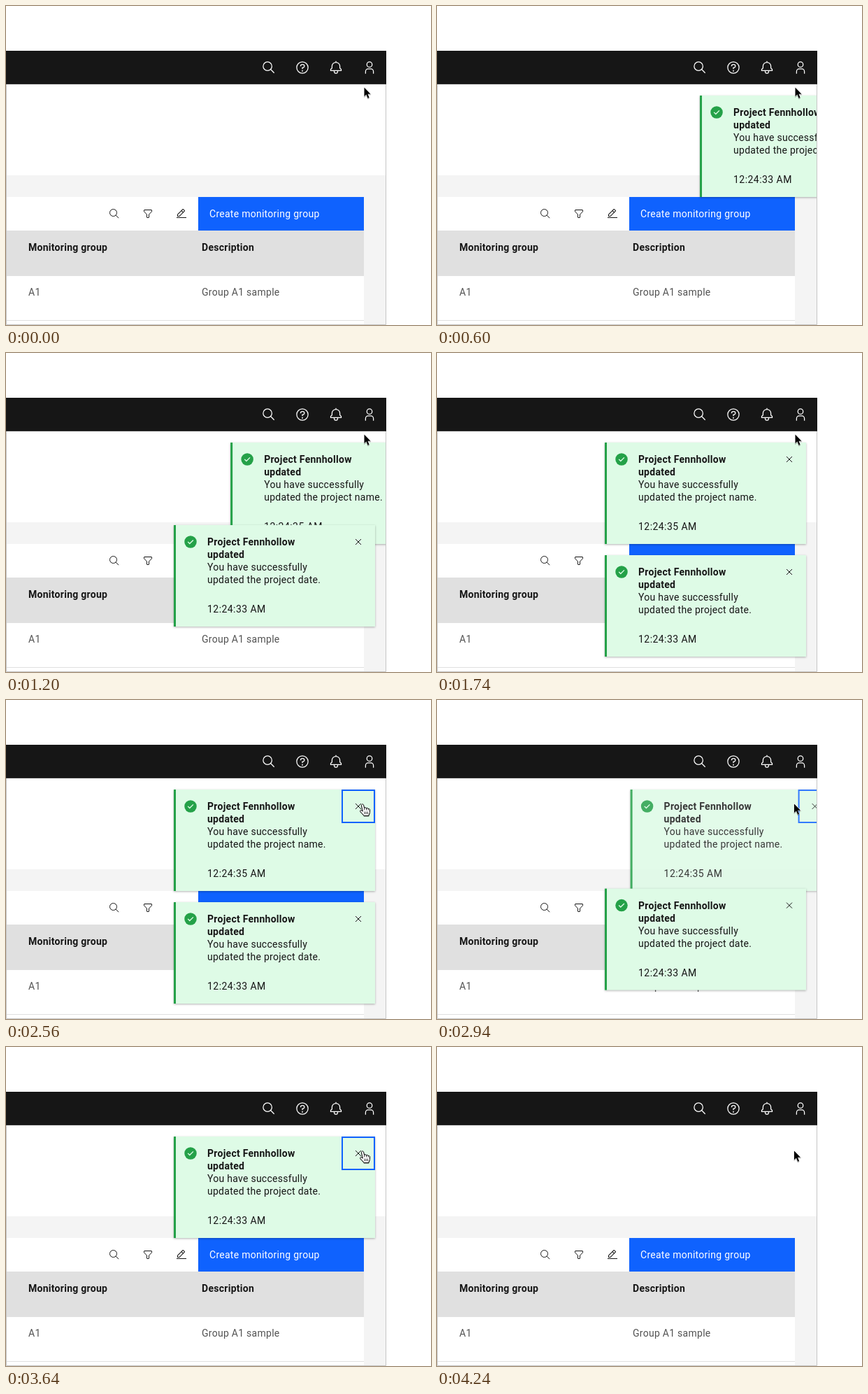
These frames come from a looping animation (608 px wide and 456 px high, 4530 ms). An HTML page:

```html
<!DOCTYPE html>
<html lang="en">
<head>
<meta charset="utf-8">
<title>Toast notifications</title>
<style>
  html, body { margin: 0; width: 100%; height: 100%; overflow: hidden; background: #fff; }
  svg { display: block; }
  text { font: 14px Roboto, "Open Sans", sans-serif; letter-spacing: .27px; fill: #161616; }
  .bold { font-weight: 600; }
  .soft { fill: #525252; }
  .time { letter-spacing: .45px; }
  .line { fill: none; stroke: currentColor; stroke-width: 2; }
  .card { fill: #defbe6; filter: drop-shadow(0 1.5px 1.8px rgba(0, 0, 0, .3)); }
  .focus { fill: none; stroke: #0f62fe; stroke-width: 2; }
</style>
</head>
<body>
<svg width="608" height="456" viewBox="0 0 608 456">
  <defs>
    <clipPath id="panel"><rect y="64" width="544" height="392"/></clipPath>
    <g id="search" class="line"><circle cx="13" cy="13" r="10"/><path d="M20.5 20.5l7.8 7.8"/></g>
    <g id="help">
      <g class="line"><circle cx="16" cy="16" r="13"/>
        <path d="M12 13v-.5A3.5 3.5 0 0 1 15.5 9H17a3.5 3.5 0 0 1 0 7H16v3.5"/></g>
      <circle cx="16" cy="23.5" r="1.5" fill="currentColor"/>
    </g>
    <path id="bell" class="line" d="M16 1v3M4 23v-3l3-3v-4a9 9 0 0 1 18 0v4l3 3v3ZM12 23v2a4 4 0 0 0 8 0v-2"/>
    <g id="user" class="line"><circle cx="16" cy="9" r="6"/>
      <path d="M7 30v-5a6 6 0 0 1 6-6h6a6 6 0 0 1 6 6v5"/></g>
    <path id="filter" class="line" d="M6 5h20a1 1 0 0 1 1 1v3.6l-8 8.4v8a1 1 0 0 1-1 1h-4a1 1 0 0 1-1-1v-8l-8-8.4V6a1 1 0 0 1 1-1Z"/>
    <path id="edit" fill="currentColor" fill-rule="evenodd" d="M2 26h28v2H2zM25.4 9c.8-.8.8-2 0-2.8l-3.6-3.6c-.8-.8-2-.8-2.8 0l-15 15V24h6.4L25.4 9zM20.4 4L24 7.6l-3 3L17.4 7 20.4 4zM6 22v-3.6l10-10 3.6 3.6-10 10H6z"/>
  </defs>

  <rect width="608" height="456" fill="#fff"/>
  <rect y="242" width="544" height="214" fill="#f4f4f4"/>
  <rect y="273" width="512" height="183" fill="#fff"/>
  <rect x="275" y="273" width="237" height="48" fill="#0f62fe"/>
  <rect y="321" width="512" height="65" fill="#e0e0e0"/>
  <rect y="449" width="512" height="1" fill="#e0e0e0"/>
  <rect y="64" width="544" height="47" fill="#161616"/>
  <rect y="111" width="544" height="1" fill="#393939"/>

  <g id="icons"></g>

  <text x="291" y="302" style="fill:#fff">Create monitoring group</text>
  <text x="32" y="350" class="bold">Monitoring group</text>
  <text x="280" y="350" class="bold">Description</text>
  <text x="32" y="414" class="soft">A1</text>
  <text x="280" y="414" class="soft">Group A1 sample</text>

  <g id="toasts" clip-path="url(#panel)"></g>
  <path d="M.5 112V455.5H543.5V112" fill="none" stroke="#c6c6c6"/>

  <g id="cursor" stroke-linejoin="round" stroke-linecap="round">
    <path id="arrow" d="M0 0V12.8L2.9 10 5.1 15.2 7.1 14.4 5 9.3H9Z" fill="#000" stroke="#fff"
      style="paint-order:stroke;filter:drop-shadow(0 1px .7px rgba(0,0,0,.35))"/>
    <g id="hand" stroke="#000" style="filter:drop-shadow(0 1px .7px rgba(0,0,0,.3))">
      <path fill="#fff" d="M-2.6 1.8C-2.6-.1.2-.1.6 1.6L1.6 6C2 4.8 4.2 4.9 4.5 6.4 5 5.5 7 5.7 7.2 7.2 7.8 6.5 9.4 6.9 9.5 8.4V12C9.3 14 8 15 8 17H1C.6 15.5-2 13.6-4 11-5 9.6-3.6 8.4-2.2 9.4L-1 10.4Z"/>
      <path fill="none" stroke-width=".8" d="M1.6 6V8.4M4.5 6.4V8.6M7.2 7.2V8.8M2 11.5V14.5M4.2 11.5V14.5M6.4 11.5V14.5"/>
    </g>
  </g>
</svg>
<script>
const LOOP = 4530, LEFT = 240, TOP = 128, TRAVEL = 304, PITCH = 161;
const $ = id => document.getElementById(id);
const show = (el, on) => el.style.display = on ? '' : 'none';

function bezier(x1, y1, x2, y2) {
  const at = (a, b, s) => 3 * (1 - s) * (1 - s) * s * a + 3 * (1 - s) * s * s * b + s ** 3;
  return x => {
    let lo = 0, hi = 1;
    for (let i = 0; i < 24; i++) {
      const mid = (lo + hi) / 2;
      if (at(x1, x2, mid) < x) lo = mid; else hi = mid;
    }
    return at(y1, y2, (lo + hi) / 2);
  };
}
const glide = bezier(.4, .14, .3, 1);
const drift = bezier(.42, 0, .58, 1);

function ramp(t, start, length, ease = glide) {
  const x = (t - start) / length;
  return x <= 0 ? 0 : x >= 1 ? 1 : ease(x);
}

const icon = (name, x, y, size, color) =>
  `<use href="#${name}" color="${color}" transform="translate(${x - size / 2} ${y - size / 2}) scale(${size / 32})"/>`;

$('icons').innerHTML =
  ['search', 'help', 'bell', 'user'].map((n, i) => icon(n, 376 + 48 * i, 88, 20, '#fff')).join('') +
  ['search', 'filter', 'edit'].map((n, i) => icon(n, 155 + 48 * i, 297, 16, '#161616')).join('');

function makeToast(field, time) {
  const line = (y, text, cls = '') => `<text x="48" y="${y}" class="${cls}">${text}</text>`;
  const g = document.createElementNS('http://www.w3.org/2000/svg', 'g');
  g.innerHTML = `
    <rect class="card" width="288" height="145"/>
    <rect width="3" height="145" fill="#24a148"/>
    <g transform="translate(14 14) scale(.625)">
      <circle cx="16" cy="16" r="14" fill="#24a148"/>
      <path d="M14 21.5l-5-4.96L10.59 15 14 18.35 21.41 11 23 12.58Z" fill="#defbe6"/>
    </g>
    <path d="M260 20l8 8M268 20l-8 8" stroke="#161616"/>
    ${line(29, 'Project Fennhollow', 'bold')}${line(47, 'updated', 'bold')}
    ${line(65, 'You have successfully')}${line(83, `updated the project ${field}.`)}
    ${line(125, time, 'time')}
    <rect class="focus" x="241" y="1" width="46" height="46"/>`;
  $('toasts').append(g);
  return { g, focus: g.querySelector('.focus') };
}
const newer = makeToast('name', '12:24:35 AM');
const older = makeToast('date', '12:24:33 AM');

// Places a toast and tells whether the pointer is on its close button.
function place(toast, enter, leave, drop, visible, focused, px, py) {
  const dx = TRAVEL * (1 - enter + leave), dy = PITCH * drop;
  const alpha = Math.max(0, 1 - 1.25 * leave);
  show(toast.g, visible && alpha > 0);
  show(toast.focus, focused);
  toast.g.setAttribute('transform', `translate(${LEFT + dx} ${TOP + dy})`);
  toast.g.setAttribute('opacity', alpha);
  const bx = px - LEFT - dx - 240, by = py - TOP - dy;
  return visible && alpha > 0 && bx >= 0 && bx <= 48 && by >= 0 && by <= 48;
}

function draw(t) {
  const move = ramp(t, 1730, 515, drift);
  const px = 512.5 - 1.5 * move, py = 116.5 + 32 * move;
  const stack = ramp(t, 1005, 400), unstack = ramp(t, 2876, 400);

  const onNewer = place(newer, stack, unstack, 0, t > 1005, t >= 2560, px, py);
  const onOlder = place(older, ramp(t, 508, 240), ramp(t, 3920, 240), stack - unstack,
    t > 508, t >= 3640, px, py);

  const hover = onNewer || onOlder;
  show($('hand'), hover);
  show($('arrow'), !hover);
  $('cursor').setAttribute('transform', `translate(${px} ${py})`);
}

const begin = performance.now();
function tick() {
  draw((performance.now() - begin) % LOOP);
  requestAnimationFrame(tick);
}
tick();
</script>
</body>
</html>
```
